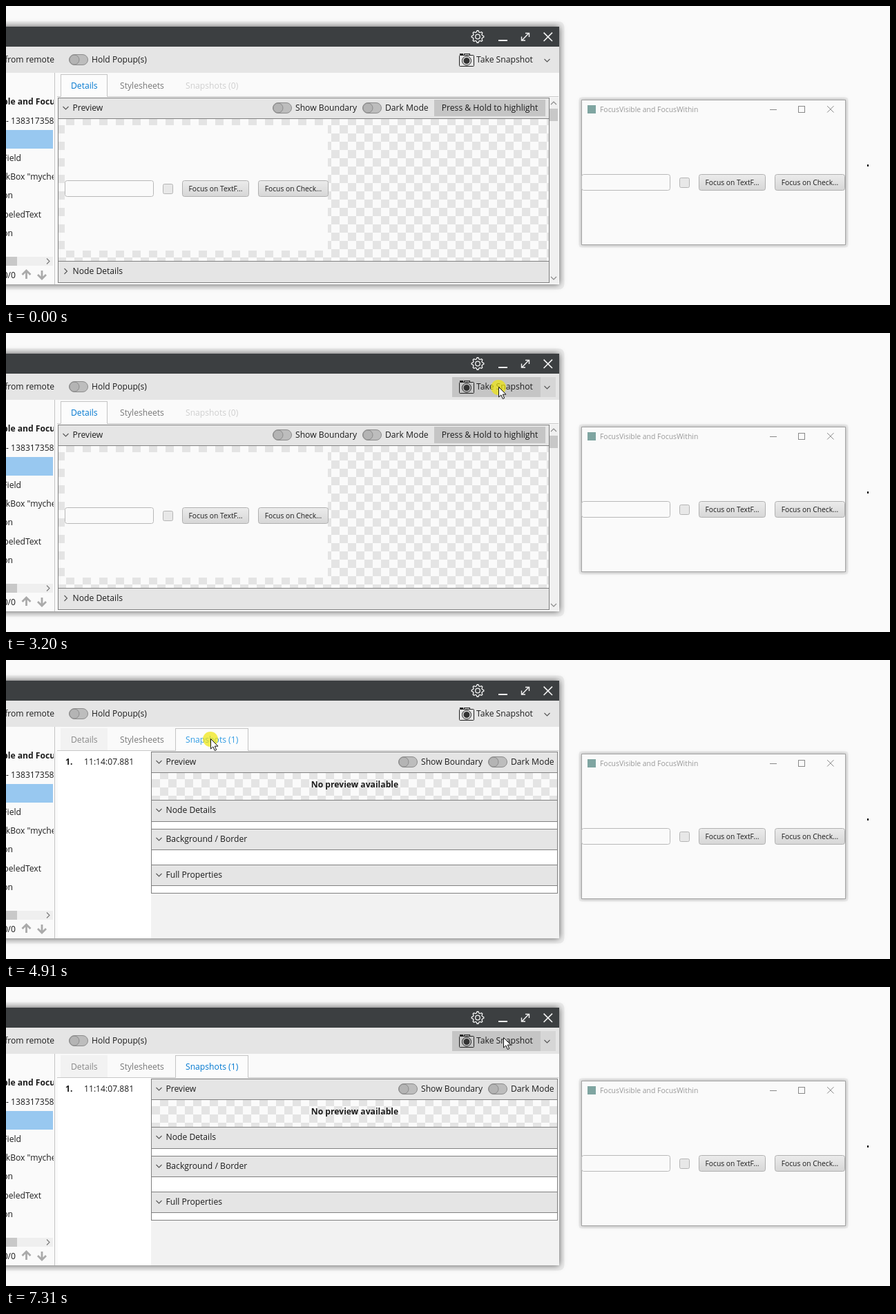
Animation, 1280 px wide and 434 px high, one loop 8 s. Source, as an HTML page with a canvas:

```html
<!DOCTYPE html>
<html lang="en">
<head>
<meta charset="utf-8">
<title>Snapshot tool</title>
<style>
html, body { margin: 0; width: 100%; height: 100%; overflow: hidden; background: #fafafa; }
canvas { display: block; width: 100vw; height: 100vh; }
</style>
</head>
<body>
<canvas id="stage" width="1280" height="434"></canvas>
<script>
const ctx = document.getElementById('stage').getContext('2d');
const LOOP = 8000, STEP = 77;
const INK = '#1c1c1c', BAR = '#e5e5e5', PAPER = '#fafafa', EDGE = '#808080', BLUE = '#0078d0';
const FAMILY = '"Open Sans", "Noto Sans", sans-serif';
const ARROW = new Path2D('M0 0V14.5L3.4 11.4L5.8 17L8.2 16L5.8 10.6H10.5Z');

const rush = p => 1 - (1 - p) ** 3.8;
const glide = p => {
  const u = p ** .78;
  return u ** 3 * (u * (6 * u - 15) + 10);
};
const steady = p => p;

// The pointer follows one quadratic curve per move and rests in between.
const moves = [
  { start: 700, end: 1480, from: [920, 392], via: [150, 430], to: [300, 119], ease: rush },
  { start: 1560, end: 1790, from: [300, 120], via: [285, 119], to: [270, 120], ease: steady },
  { start: 1960, end: 2720, from: [280, 118], via: [496, 88], to: [713, 78], ease: glide },
  { start: 3750, end: 4520, from: [705, 79], via: [430, 85], to: [296, 114], ease: glide },
  { start: 5290, end: 5840, from: [286, 116], via: [210, 150], to: [147, 161], ease: glide },
  { start: 6240, end: 7010, from: [153, 170], via: [260, 220], to: [729, 94], ease: glide },
  { start: 7080, end: 7310, from: [728, 88], via: [724, 78], to: [720, 73], ease: steady }
];

function cursorAt(t) {
  const move = moves.filter(m => m.start <= t).pop();
  if (!move) return null;
  const { start, end, from, via, to, ease } = move;
  const steps = Math.round((end - start) / STEP);
  const progress = Math.min(1, (t - start) / (end - start));
  const u = ease(Math.floor(progress * steps + .1) / steps), v = 1 - u;
  return [0, 1].map(k => Math.round(v * v * from[k] + 2 * u * v * via[k] + u * u * to[k]));
}

function rect(x, y, w, h, fill, stroke) {
  if (fill) { ctx.fillStyle = fill; ctx.fillRect(x, y, w, h); }
  if (stroke) {
    ctx.strokeStyle = stroke; ctx.lineWidth = 1;
    ctx.strokeRect(x + .5, y + .5, w - 1, h - 1);
  }
}

function round(x, y, w, h, r, fill, stroke) {
  ctx.beginPath();
  ctx.roundRect(x + .5, y + .5, w - 1, h - 1, r);
  if (fill) { ctx.fillStyle = fill; ctx.fill(); }
  if (stroke) { ctx.strokeStyle = stroke; ctx.lineWidth = 1; ctx.stroke(); }
}

function text(s, x, y, { color = INK, size = 12.15, bold = false, align = 'left' } = {}) {
  ctx.font = `${bold ? 'bold ' : ''}${size}px ${FAMILY}`;
  ctx.textAlign = align;
  ctx.fillStyle = color;
  ctx.fillText(s, x, y);
}

function line(color, width, ...paths) {
  ctx.strokeStyle = color; ctx.lineWidth = width;
  ctx.beginPath();
  for (const [x, y, ...rest] of paths) {
    ctx.moveTo(x, y);
    for (let i = 0; i < rest.length; i += 2) ctx.lineTo(rest[i], rest[i + 1]);
  }
  ctx.stroke();
}

function chevron(x, y, angle = 0, color = '#555', size = 4) {
  ctx.save();
  ctx.translate(x, y); ctx.rotate(angle);
  line(color, 1.1, [-size, -size / 2, 0, size / 2, size, -size / 2]);
  ctx.restore();
}

function cross(x, y, r, color, width) {
  line(color, width, [x - r, y - r, x + r, y + r], [x + r, y - r, x - r, y + r]);
}

function arrow(x, y, direction) {
  line('#aaa', 2.8, [x, y - 6 * direction, x, y + 6 * direction],
    [x - 6, y, x, y + 6 * direction, x + 6, y]);
}

function circle(x, y, r, fill, stroke, width = 1) {
  ctx.beginPath(); ctx.arc(x, y, r, 0, 7);
  if (fill) { ctx.fillStyle = fill; ctx.fill(); }
  if (stroke) { ctx.strokeStyle = stroke; ctx.lineWidth = width; ctx.stroke(); }
}

function toggle(x, y, label) {
  round(x, y - 8, 28, 16, 8, '#bdbdbd', '#8c8c8c');
  circle(x + 8, y, 7, '#b4b4b4', '#8c8c8c');
  text(label, x + 33, y + 4);
}

function checker(x, y, w, h, cell = 12) {
  ctx.save();
  ctx.beginPath(); ctx.rect(x, y, w, h); ctx.clip();
  rect(x, y, w, h, PAPER);
  for (let r = 0; r * cell < h + cell; r++)
    for (let c = (r + 1) % 2; c * cell < w; c += 2)
      rect(x + c * cell, y - 2 + r * cell, cell, cell, '#e4e4e4');
  ctx.restore();
}

function pane(x, y, w, h, label, open = true) {
  rect(x, y, w, h, BAR, EDGE);
  chevron(x + 11.5, y + 15, open ? 0 : -Math.PI / 2);
  text(label, x + 21.5, y + 19);
}

function shadowed(x, y, w, h, blur, color, spread) {
  round(x - spread, y - spread, w + 2 * spread, h + 2 * spread, spread, '#ececec');
  ctx.save();
  ctx.shadowColor = color; ctx.shadowBlur = blur;
  rect(x, y, w, h, PAPER);
  ctx.restore();
}

function form(x, y) {
  const bevel = ctx.createLinearGradient(0, y, 0, y + 24);
  bevel.addColorStop(0, '#ececec'); bevel.addColorStop(1, '#d6d6d6');
  const button = (s, dx, w) => {
    round(x + dx, y, w, 24, 3, bevel, '#b0b0b0');
    text(s, x + dx + w / 2, y + 16, { size: 10.3, align: 'center' });
  };
  round(x, y, 129, 24, 3, PAPER, '#b8b8b8');
  round(x + 142, y + 5, 15, 15, 2, '#e8e8e8', '#b4b4b4');
  button('Focus on TextF...', 170, 97);
  button('Focus on Check...', 280, 102);
}

function titleBar() {
  const white = '#f4f4f4';
  rect(0, 30, 801, 29, '#3c3f41');
  ctx.beginPath();
  for (let i = 0; i < 32; i++) {
    const a = (i - .5) * Math.PI / 16, r = i % 4 < 2 ? 8.8 : 6.8;
    ctx.lineTo(683 + r * Math.cos(a), 44.5 + r * Math.sin(a));
  }
  ctx.closePath();
  ctx.strokeStyle = white; ctx.lineWidth = 1.3; ctx.stroke();
  circle(683, 44.5, 3.3, null, white, 1.3);
  rect(713, 49, 13, 2, white);
  line(white, 1.4, [747, 50, 757, 39.5], [752, 39.5, 757.5, 39.5, 757.5, 45], [746.5, 44.5, 746.5, 50, 752, 50]);
  cross(784.8, 44.8, 6.2, white, 1.6);
}

function camera(x, y) {
  round(x, y + 2, 22, 17, 1, null, '#222');
  rect(x + 1, y, 5, 2, '#222');
  rect(x + 7, y, 9, 3, null, '#222');
  circle(x + 11, y + 10.5, 6.5, null, '#222');
  circle(x + 11, y + 10.5, 4.5, '#333');
}

function toolBar(hover) {
  rect(0, 59, 801, 38, BAR);
  text('from remote', 70, 82, { align: 'right' });
  toggle(91, 78, 'Hold Popup(s)');
  if (hover) {
    rect(646, 64, 128, 29, '#c5c5c5');
    rect(774, 64, 22, 29, '#d6d6d6');
  }
  camera(656, 69);
  text('Take Snapshot', 681, 82);
  chevron(783.5, 79);
}

function treePanel() {
  ctx.save();
  ctx.beginPath(); ctx.rect(0, 97, 69, 307); ctx.clip();
  const right = { align: 'right' };
  rect(0, 180, 68, 27, '#98c8f0');
  text('ble and Focus', -5, 143, { bold: true });
  text('- 1383173584', 0, 171);
  text('TextField', 22, 225, right);
  text('ckBox "mycheck"', -6, 252);
  text('Button', 10, 279, right);
  text('LabeledText', 51, 307, right);
  text('Button', 10, 334, right);
  rect(0, 364, 68, 13, '#efefef');
  rect(0, 364, 16, 13, '#c8c8c8');
  chevron(61, 370.5, -Math.PI / 2, '#777');
  text('0/0', 14, 395, right);
  arrow(29.5, 390, -1);
  arrow(52, 390, 1);
  ctx.restore();
  rect(70, 97, 1, 307, '#c4c4c4');
}

function tabs(selected, count, snapshotColor) {
  rect(74, 131, 726, 1, '#c8c8c8');
  if (selected) rect(79, 99, 68, 32, '#f2f2f2');
  const [x, w] = selected ? [245, 106] : [79, 68];
  rect(x, 99, w, 33, '#fcfcfc', '#c4c4c4');
  rect(x + 1, 131, w - 2, 1, '#fcfcfc');
  text('Details', 94, 120, { color: selected ? '#888' : BLUE });
  text('Stylesheets', 165, 120, { color: '#777' });
  text(`Snapshots (${count})`, 260, 120, { color: snapshotColor });
}

function detailsView() {
  checker(75, 163, 711, 207);
  rect(75, 133, 712, 269, null, EDGE);
  rect(85, 173, 381, 182, PAPER);
  form(85, 253);
  pane(75, 133, 712, 31, 'Preview');
  toggle(386, 148, 'Show Boundary');
  toggle(516, 148, 'Dark Mode');
  rect(620, 136, 161, 24, '#c5c5c5');
  text('Press & Hold to highlight', 700.5, 152, { align: 'center' });
  pane(75, 370, 712, 32, 'Node Details', false);
  rect(787, 133, 13, 270, '#f0f0f0');
  rect(787, 149, 12, 18, '#c8c8c8');
  chevron(793, 141, Math.PI, '#888');
  chevron(793, 395, 0, '#888');
}

function snapshotsView(rowHover) {
  rect(75, 132, 135, 272, '#fff');
  if (rowHover) rect(75, 132, 135, 31, '#ececec');
  text('1.', 86, 152, { bold: true });
  text('11:14:07.881', 113, 152);
  rect(210, 132, 591, 272, '#f2f2f2');
  rect(210, 133, 589, 206, '#fff', EDGE);
  checker(211, 163, 587, 40);
  pane(210, 133, 589, 31, 'Preview');
  toggle(568, 148, 'Show Boundary');
  toggle(698, 148, 'Dark Mode');
  text('No preview available', 505, 185, { bold: true, align: 'center' });
  pane(210, 203, 589, 32, 'Node Details');
  pane(210, 245, 589, 31, 'Background / Border');
  pane(210, 297, 589, 31, 'Full Properties');
}

function sampleWindow() {
  shadowed(833, 136, 383, 211, 5, '#aaa', 4);
  rect(833, 136, 383, 211, PAPER, '#a4a4a4');
  rect(842, 144, 12, 12, '#7fa5a1');
  text('FocusVisible and FocusWithin', 860, 154, { size: 10.4, color: '#999' });
  rect(1106, 150, 10, 1, '#888');
  rect(1147, 145, 10, 10, null, '#888');
  cross(1193.8, 149.8, 4.7, '#888', 1);
  form(833, 244);
  rect(1247, 230, 2, 3, '#111');
}

function drawCursor(x, y, clicking) {
  if (clicking) circle(x, y + 1, 11, 'rgba(240, 230, 10, .7)');
  ctx.save();
  ctx.translate(x + .5, y + .5);
  ctx.fillStyle = '#fff'; ctx.fill(ARROW);
  ctx.strokeStyle = '#111'; ctx.lineWidth = 1; ctx.stroke(ARROW);
  ctx.restore();
}

function draw(t) {
  const cursor = cursorAt(t);
  const over = (x, y, w, h) => cursor && cursor[0] >= x && cursor[0] < x + w
    && cursor[1] >= y && cursor[1] < y + h;
  const selected = t >= 4910, count = t >= 3290 ? 1 : 0;
  const clicking = (t >= 3200 && t < 3290) || (t >= 4910 && t < 4990);
  const tabHover = over(245, 99, 106, 32);
  const snapshotColor = !count ? (tabHover ? '#97c6ec' : '#cfcfcf')
    : selected && clicking ? '#309be3'
    : selected || tabHover ? BLUE : '#777';

  rect(0, 0, 1280, 434, PAPER);
  shadowed(-30, 30, 831, 374, 9, '#555', 8);
  titleBar();
  toolBar(over(646, 64, 150, 29));
  treePanel();
  tabs(selected, count, snapshotColor);
  if (selected) snapshotsView(over(75, 132, 135, 31));
  else detailsView();
  sampleWindow();
  if (cursor) drawCursor(...cursor, clicking);
}

const begin = performance.now();
function tick() {
  draw((performance.now() - begin) % LOOP);
  requestAnimationFrame(tick);
}
tick();
</script>
</body>
</html>
```
